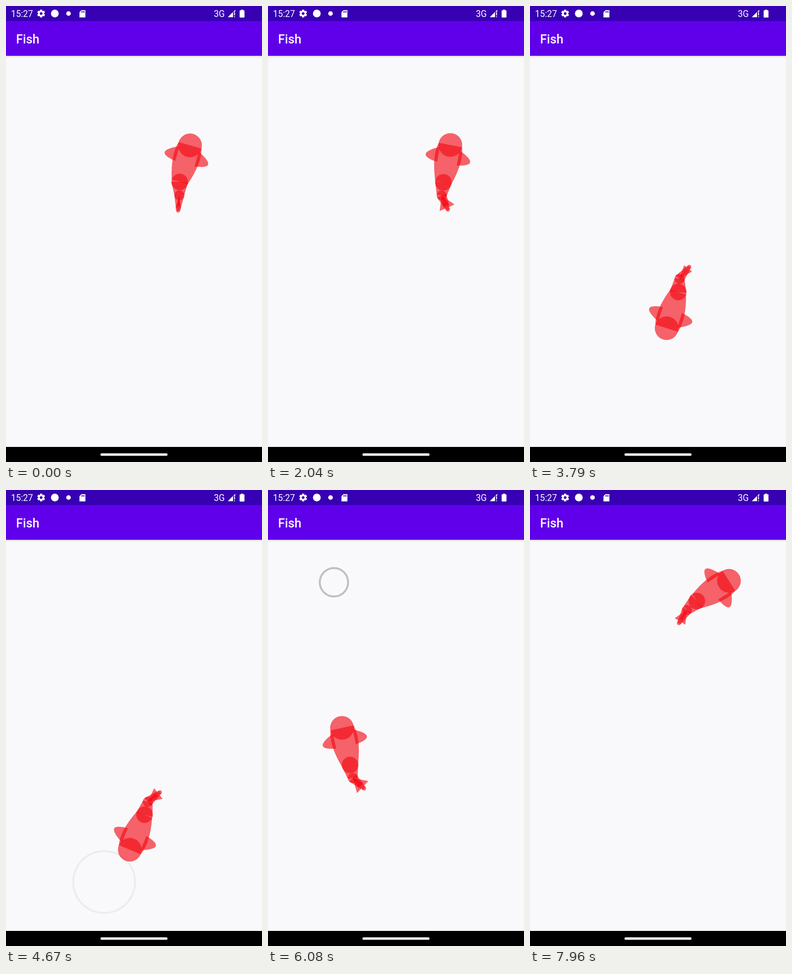
These frames come from a looping animation (561x998 px, 8000 ms). An HTML page with a canvas:

```html
<!DOCTYPE html>
<html lang="en">
<head>
<meta charset="utf-8">
<title>Fish</title>
<style>
  html, body { margin: 0; width: 100%; height: 100%; overflow: hidden; background: #f9f9fb; }
  canvas { display: block; width: 561px; height: 998px; }
</style>
</head>
<body>
<canvas id="stage"></canvas>
<script>
const W = 561, H = 998, LOOP = 8000;
const canvas = document.getElementById('stage');
const ctx = canvas.getContext('2d');
const dpr = window.devicePixelRatio || 1;
canvas.width = W * dpr;
canvas.height = H * dpr;

// Device pixels to stage pixels
const PX = 561 / 1080;
const HEAD = 50 * PX;
const BODY = 3.2 * HEAD;
const BIG = 0.7 * HEAD;
const MID = 0.6 * BIG;
const SMALL = 0.4 * MID;
const FIN = 1.3 * HEAD;
const SWIM_MS = 2000, RIPPLE_MS = 1000;

const rad = deg => deg * Math.PI / 180;
const sin = deg => Math.sin(rad(deg));
const cos = deg => Math.cos(rad(deg));
const polar = (p, len, deg) => ({ x: p.x + len * cos(deg), y: p.y - len * sin(deg) });
const ease = u => (1 - Math.cos(Math.PI * Math.min(1, Math.max(0, u)))) / 2;

function bezier(p, t) {
  const s = 1 - t;
  const mix = k => s * s * s * p[0][k] + 3 * s * s * t * p[1][k] + 3 * s * t * t * p[2][k] + t * t * t * p[3][k];
  return { x: mix('x'), y: mix('y') };
}

function bezierAngle(p, t) {
  const s = 1 - t;
  const mix = k => s * s * (p[1][k] - p[0][k]) + 2 * s * t * (p[2][k] - p[1][k]) + t * t * (p[3][k] - p[2][k]);
  return Math.atan2(-mix('y'), mix('x')) * 180 / Math.PI;
}

// Leave along the heading, then bend halfway towards the touched point
function makeMove(start, tap, x, y, heading, tx, ty) {
  const from = { x, y }, to = { x: tx, y: ty };
  const aim = Math.atan2(y - ty, tx - x) * 180 / Math.PI;
  const turn = ((aim - heading + 540) % 360 + 360) % 360 - 180;
  const pts = [from, polar(from, BODY / 2, heading), polar(from, 1.6 * HEAD, heading + turn / 2), to];
  const lengths = [0];
  const steps = 240;
  let prev = from;
  for (let i = 1; i <= steps; i++) {
    const q = bezier(pts, i / steps);
    lengths.push(lengths[i - 1] + Math.hypot(q.x - prev.x, q.y - prev.y));
    prev = q;
  }
  return { start, tap, to, pts, lengths };
}

const moves = [
  makeMove(2410, 2486, 392, 345, 80, 299, 765.5),
  makeMove(3915, 3906, 308, 694, 264, 215, 858),
  makeMove(4786, 4820, 280, 759, 242, 50, 250),
  makeMove(5632, 5645, 183, 608, 114, 144.5, 202),
  makeMove(6575, 6593, 160, 432, 86, 471.5, 166)
];

function moveParam(move, fraction) {
  const { lengths } = move;
  const n = lengths.length - 1;
  const goal = fraction * lengths[n];
  let i = 1;
  while (i < n && lengths[i] < goal) i++;
  const span = lengths[i] - lengths[i - 1];
  return (i - 1 + (goal - lengths[i - 1]) / span) / n;
}

function swimPose(ms) {
  const move = moves.filter(m => m.start <= ms).pop();
  if (!move) return { x: 392, y: 345, angle: 70.6 };
  const t = moveParam(move, ease((ms - move.start) / SWIM_MS));
  return { ...bezier(move.pts, t), angle: bezierAngle(move.pts, t) };
}

// Each start speeds the tail up, each finished swim slows it down again
function tailRate(ms) {
  const latest = delay => Math.max(-1, ...moves.map(m => m.start + delay).filter(s => s <= ms));
  return latest(0) > latest(SWIM_MS) ? 3 : 1;
}

function disc(p, r) {
  ctx.beginPath();
  ctx.arc(p.x, p.y, r, 0, 2 * Math.PI);
  ctx.fill();
}

function polygon(...pts) {
  ctx.beginPath();
  pts.forEach(p => ctx.lineTo(p.x, p.y));
  ctx.closePath();
  ctx.fill();
}

function drawFin(head, angle, side) {
  const start = polar(head, 0.9 * HEAD, angle + side * 110);
  const end = polar(start, FIN, angle + 180);
  const bend = polar(start, 1.8 * FIN, angle + side * 115);
  ctx.beginPath();
  ctx.moveTo(start.x, start.y);
  ctx.quadraticCurveTo(bend.x, bend.y, end.x, end.y);
  ctx.fill();
}

function drawSegment(from, r1, r2, length, angle, withBase) {
  const end = polar(from, length, angle + 180);
  if (withBase) disc(from, r1);
  disc(end, r2);
  polygon(polar(from, r1, angle + 90), polar(end, r2, angle + 90),
          polar(end, r2, angle - 90), polar(from, r1, angle - 90));
  return end;
}

function drawTailFin(from, length, half, angle) {
  const base = polar(from, length, angle + 180);
  polygon(from, polar(base, half, angle + 90), polar(base, half, angle - 90));
}

function drawBody(head, bottom, angle) {
  const tl = polar(head, HEAD, angle + 90), tr = polar(head, HEAD, angle - 90);
  const bl = polar(bottom, BIG, angle + 90), br = polar(bottom, BIG, angle - 90);
  const cl = polar(head, 0.56 * BODY, angle + 130), cr = polar(head, 0.56 * BODY, angle - 130);
  ctx.beginPath();
  ctx.moveTo(tl.x, tl.y);
  ctx.quadraticCurveTo(cl.x, cl.y, bl.x, bl.y);
  ctx.lineTo(br.x, br.y);
  ctx.quadraticCurveTo(cr.x, cr.y, tr.x, tr.y);
  ctx.fill();
}

function drawFish(ms) {
  const pose = swimPose(ms);
  const lag = 44 * Math.max(0, 1 - ms / 240);
  const phase = (1143 + 0.36 * ms - lag) * tailRate(ms);
  const angle = pose.angle + 10 * sin(0.8 * phase);
  const sway = angle + 15 * cos(phase);
  const flick = angle + 35 * sin(phase);
  const spread = Math.abs(sin(phase)) * BIG;

  ctx.fillStyle = 'rgba(244, 10, 20, 0.627)';
  const head = polar(pose, BODY / 2, angle);
  disc(head, HEAD);
  drawFin(head, angle, -1);
  drawFin(head, angle, 1);
  const bottom = polar(head, BODY, angle + 180);
  const mid = drawSegment(bottom, BIG, MID, 1.6 * BIG, sway, true);
  drawSegment(mid, MID, SMALL, 3.1 * MID, flick, false);
  drawTailFin(mid, 2.7 * MID, spread, flick);
  drawTailFin(mid, 2.7 * MID - 10 * PX, spread - 20 * PX, flick);
  drawBody(head, bottom, angle);
}

function drawRipple(ms) {
  const move = moves.filter(m => m.tap <= ms).pop();
  if (!move || ms - move.tap >= RIPPLE_MS) return;
  const v = ease((ms - move.tap) / RIPPLE_MS);
  ctx.strokeStyle = `rgba(0, 0, 0, ${100 / 255 * (1 - v)})`;
  ctx.lineWidth = 8 * PX;
  ctx.beginPath();
  ctx.arc(move.to.x, move.to.y, 150 * PX * v, 0, 2 * Math.PI);
  ctx.stroke();
}

function rect(x, y, w, h, color) {
  ctx.fillStyle = color;
  ctx.fillRect(x, y, w, h);
}

function label(text, x, y, font) {
  ctx.font = font + ' Roboto, sans-serif';
  ctx.fillText(text, x, y);
}

function drawGear(x, y) {
  ctx.beginPath();
  for (let i = 0; i < 6; i++) {
    const a = i * 60;
    [[-16, 8.9], [16, 8.9], [22, 6.6], [38, 6.6]].forEach(([d, r]) => {
      const p = polar({ x, y }, r, a + d + 90);
      ctx.lineTo(p.x, p.y);
    });
  }
  ctx.closePath();
  ctx.moveTo(x + 3, y);
  ctx.arc(x, y, 3, 0, 2 * Math.PI);
  ctx.fill('evenodd');
}

function drawStatusIcons() {
  drawGear(77, 16.5);
  disc({ x: 107, y: 16.5 }, 8.5);
  disc({ x: 137, y: 16.5 }, 5);

  // Memory card
  polygon({ x: 165.5, y: 9 }, { x: 174, y: 9 }, { x: 174, y: 25 }, { x: 161, y: 25 }, { x: 161, y: 13.5 });
  for (let i = 0; i < 3; i++) rect(165.3 + i * 2.7, 11, 1.5, 3.6, '#3700b3');

  // Signal and battery
  ctx.fillStyle = '#fff';
  polygon({ x: 486, y: 24.5 }, { x: 497.5, y: 13 }, { x: 497.5, y: 24.5 });
  polygon({ x: 499, y: 11.5 }, { x: 502.5, y: 8.5 }, { x: 502.5, y: 12 }, { x: 499, y: 14 });
  rect(499.8, 14, 2, 6.5, '#fff');
  rect(499.8, 22.5, 2, 2, '#fff');
  rect(514.8, 8, 5, 3, '#fff');
  ctx.beginPath();
  ctx.roundRect(512, 9.6, 10.6, 15.6, 1.3);
  ctx.fill();
}

function drawChrome() {
  const shade = ctx.createLinearGradient(0, 109, 0, 114);
  shade.addColorStop(0, 'rgba(0, 0, 0, 0.10)');
  shade.addColorStop(1, 'rgba(0, 0, 0, 0)');
  rect(0, 109, W, 5, shade);
  rect(0, 0, W, 33, '#3700b3');
  rect(0, 33, W, 76, '#6000ea');
  rect(0, 965, W, 33, '#000');

  ctx.fillStyle = '#fff';
  label('15:27', 11, 24, '19.3px');
  label('3G', 455.5, 23.5, '19.3px');
  label('Fish', 22, 81.5, '500 27.3px');
  drawStatusIcons();

  ctx.fillStyle = '#eee';
  ctx.beginPath();
  ctx.roundRect(207, 979, 147, 5.4, 2.7);
  ctx.fill();
}

function draw(ms) {
  ctx.setTransform(dpr, 0, 0, dpr, 0, 0);
  rect(0, 0, W, H, '#f9f9fb');
  drawRipple(ms);
  drawFish(ms);
  drawChrome();
}

let origin = null;
function tick(now) {
  if (origin === null) origin = now;
  draw((now - origin) % LOOP);
  requestAnimationFrame(tick);
}
draw(0);
requestAnimationFrame(tick);
</script>
</body>
</html>
```
